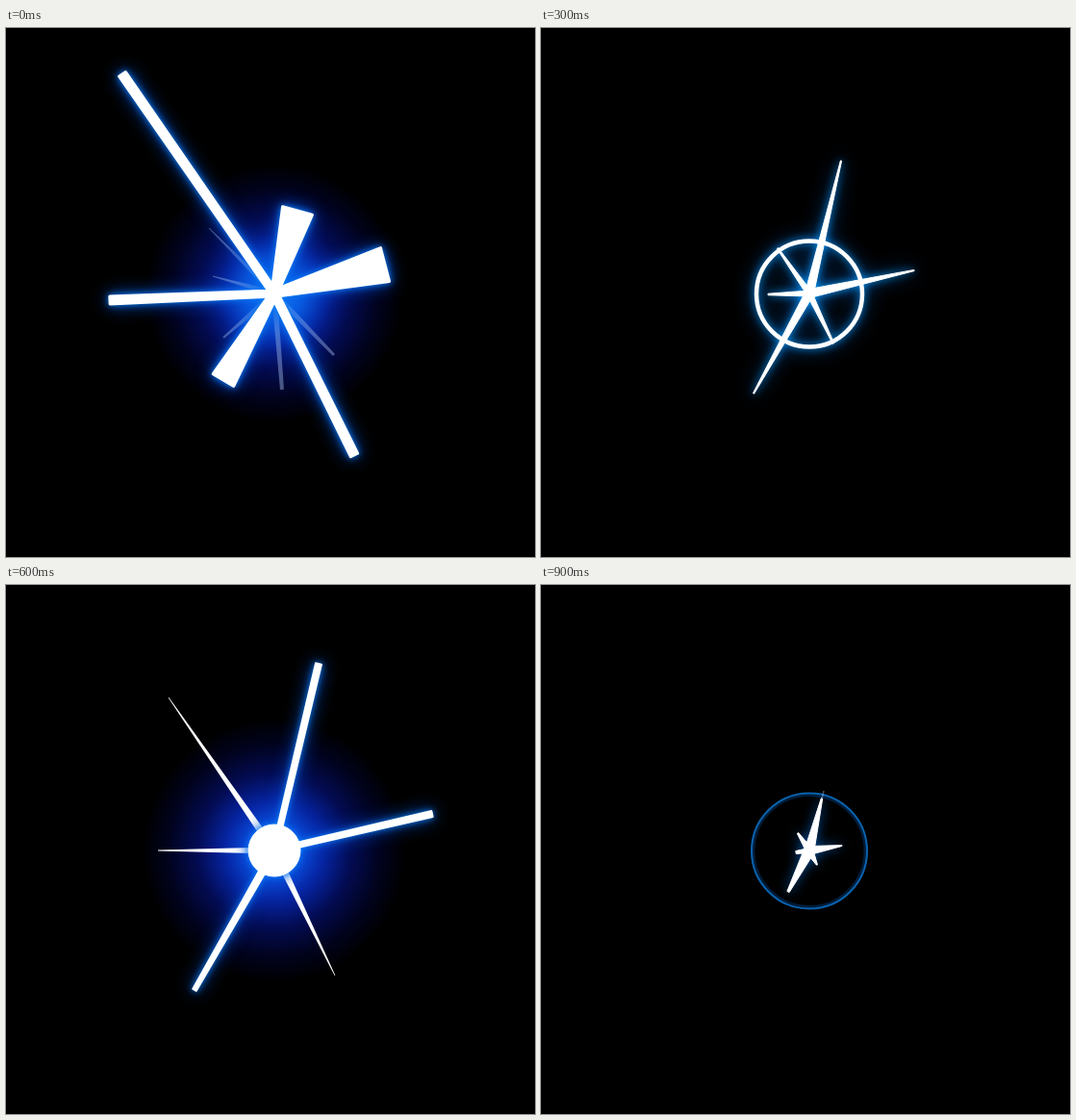
An HTML page for the animation above (1 s loop, 550 by 550 pixels).

```html
<!DOCTYPE html>
<html lang="en">
<head>
<meta charset="utf-8">
<title>Spark</title>
<style>
  html, body { margin: 0; width: 100%; height: 100%; overflow: hidden; background: #000; }
  svg { display: block; width: 100vw; height: 100vh; }
  .pose { visibility: hidden; animation: show 500ms step-end infinite; animation-delay: calc(var(--i) * 100ms - 500ms); }
  @keyframes show {
    0% { visibility: visible; }
    20%, 100% { visibility: hidden; }
  }
  .lit { fill: #fff; stroke: #fff; stroke-width: 1; stroke-linejoin: round; }
  .hollow { fill: none; }
  .faint { fill: #a9c4ee; opacity: .42; }
</style>
</head>
<body>
<svg viewBox="0 0 550 550">
  <defs>
    <filter id="strong" filterUnits="userSpaceOnUse" x="0" y="0" width="550" height="550" color-interpolation-filters="sRGB">
      <feGaussianBlur in="SourceAlpha" stdDeviation="3.5" result="a"/>
      <feFlood flood-color="#0a84ff"/><feComposite in2="a" operator="in" result="near"/>
      <feGaussianBlur in="SourceAlpha" stdDeviation="9" result="b"/>
      <feFlood flood-color="#0050d8"/><feComposite in2="b" operator="in" result="far"/>
      <feMerge><feMergeNode in="far"/><feMergeNode in="near"/><feMergeNode in="SourceGraphic"/></feMerge>
    </filter>
    <filter id="cyan" filterUnits="userSpaceOnUse" x="0" y="0" width="550" height="550" color-interpolation-filters="sRGB">
      <feGaussianBlur in="SourceAlpha" stdDeviation="4" result="a"/>
      <feFlood flood-color="#0098f8"/><feComposite in2="a" operator="in" result="near"/>
      <feGaussianBlur in="SourceAlpha" stdDeviation="10" result="b"/>
      <feFlood flood-color="#005cc0"/><feComposite in2="b" operator="in" result="far"/>
      <feMerge><feMergeNode in="far"/><feMergeNode in="near"/><feMergeNode in="SourceGraphic"/></feMerge>
    </filter>
    <filter id="soft" filterUnits="userSpaceOnUse" x="180" y="180" width="200" height="200" color-interpolation-filters="sRGB">
      <feGaussianBlur in="SourceAlpha" stdDeviation="6" result="a"/>
      <feFlood flood-color="#00509c"/><feComposite in2="a" operator="in" result="near"/>
      <feMerge><feMergeNode in="near"/><feMergeNode in="SourceGraphic"/></feMerge>
    </filter>
    <radialGradient id="halo">
      <stop offset="0" stop-color="#1470ff"/>
      <stop offset=".2" stop-color="#0a48d8"/>
      <stop offset=".38" stop-color="#0624a0"/>
      <stop offset=".58" stop-color="#030c54"/>
      <stop offset=".8" stop-color="#01031f"/>
      <stop offset="1" stop-color="#000"/>
    </radialGradient>
    <radialGradient id="core">
      <stop offset="0" stop-color="#20a8ff" stop-opacity=".9"/>
      <stop offset=".5" stop-color="#0a70f0" stop-opacity=".45"/>
      <stop offset="1" stop-color="#0040c0" stop-opacity="0"/>
    </radialGradient>
  </defs>

  <g class="pose" style="--i:0">
    <circle cx="279" cy="276" r="134" fill="url(#halo)"/>
    <circle cx="279" cy="276" r="62" fill="url(#core)"/>
    <path class="faint" data-rays="211 208 6 1, 215 258 6 1, 226 322 7 2, 287 376 6 4, 341 340 6 3"/>
    <g filter="url(#strong)">
      <path class="lit" style="stroke-width:3" data-rays="121 48 7 8, 108 283 6 8, 362 444 7 8, 303 190 6 32, 394 246 7 36, 226 366 7 25"/>
      <circle class="lit" cx="280" cy="274" r="8"/>
    </g>
  </g>

  <g class="pose" style="--i:1">
    <circle cx="279" cy="276" r="137" fill="url(#halo)"/>
    <path class="lit" style="stroke:none" data-rays="169 117 8 .6, 158 276 7 .8, 342 406 8 .6"/>
    <g filter="url(#strong)">
      <path class="lit" style="stroke-width:2" data-rays="325 82 5 6, 443 238 5 6, 196 421 7 4"/>
      <circle class="lit" cx="279" cy="276" r="27"/>
    </g>
  </g>

  <g class="pose" style="--i:2">
    <circle cx="279" cy="276" r="80" fill="url(#core)" opacity=".5"/>
    <path class="faint" data-rays="334 48 4 1.5, 186 440 4 1"/>
    <g filter="url(#cyan)">
      <path class="lit" data-rays="330 63 9 1.5, 455 235 9 1.5, 189 434 9 1.5, 226 203 6 2, 209 276 5 2.5, 320 362 6 2"/>
      <circle class="lit hollow" cx="279" cy="276.5" r="46" style="stroke-width:10.5"/>
    </g>
  </g>

  <g class="pose" style="--i:3">
    <g filter="url(#cyan)">
      <path class="lit" data-rays="312 138 9 1.2, 388 252 9 1.2, 221 380 9 1.2, 246 229 6 1.5, 236 277 6 1.5, 304 328 6 1.5"/>
      <circle class="lit hollow" cx="279" cy="276.5" r="55" style="stroke-width:4.5"/>
    </g>
  </g>

  <g class="pose" style="--i:4">
    <circle cx="279" cy="276.5" r="58.5" fill="none" stroke="#003468" stroke-width="4" opacity=".55"/>
    <circle cx="279" cy="276.5" r="60" fill="none" stroke="#0a62ac" stroke-width="2"/>
    <path class="faint" data-rays="294 214 4 1.5"/>
    <g filter="url(#soft)">
      <path class="lit" data-rays="292 222 10 1.5, 313 271 9 .8, 257 319 11 2.5, 267 258 7 1.5, 265 278 5 3, 287 291 8 1"/>
      <circle class="lit" cx="279" cy="275.5" r="5.5"/>
    </g>
  </g>
</svg>
<script>
  const cx = 279, cy = 276;

  // A straight beam from the centre: tip position, inner width, outer width.
  function beam(text) {
    const [x, y, inner, outer] = text.trim().split(" ").map(Number);
    const len = Math.hypot(x - cx, y - cy);
    const nx = (cy - y) / len, ny = (x - cx) / len;
    const at = (px, py, w) => `${px + nx * w / 2} ${py + ny * w / 2}`;
    return `M${at(cx, cy, inner)}L${at(x, y, outer)}L${at(x, y, -outer)}L${at(cx, cy, -inner)}Z`;
  }

  for (const path of document.querySelectorAll("[data-rays]")) {
    path.setAttribute("d", path.dataset.rays.split(",").map(beam).join(""));
  }
</script>
</body>
</html>
```
